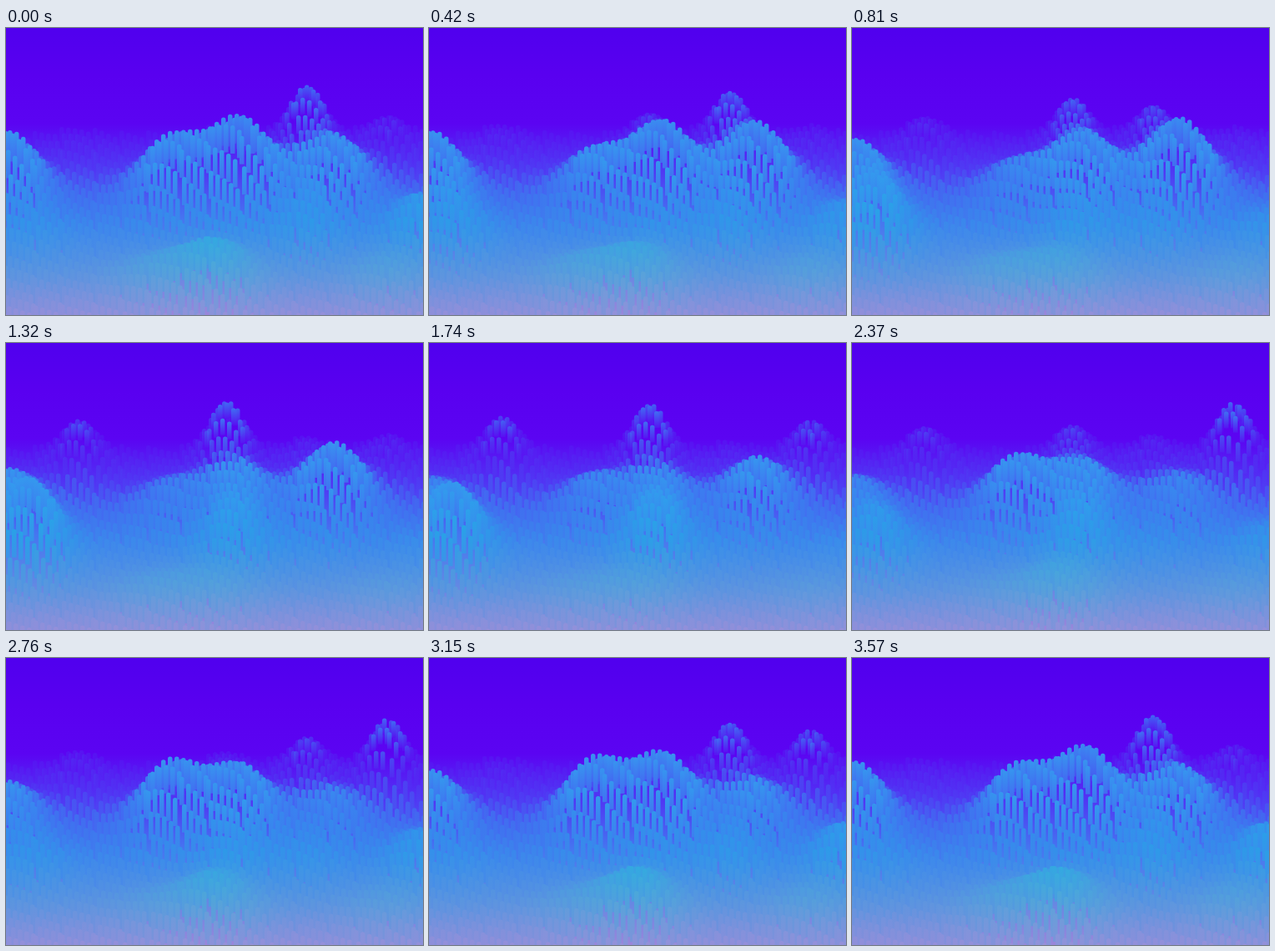
An HTML page with a canvas that plays this animation: 500 px wide and 345 px high, repeating every 3.6 s.

```html
<!DOCTYPE html>
<html lang="en">
<head>
<meta charset="utf-8">
<title>Pillar waves</title>
<style>
  html, body { margin: 0; width: 100%; height: 100%; overflow: hidden; background: #5200ef; }
  canvas { display: block; }
</style>
</head>
<body>
<canvas id="stage" width="500" height="345"></canvas>
<script>
const ctx = document.getElementById('stage').getContext('2d');
const W = 500, H = 345, LOOP = 3600, STEP = 30;
const COL = 8, ROW = 11, PILLAR = 5.5, HORIZON = 126, DEPTH = 30;

// Colours spread evenly from the top of the stage to the bottom.
const palette = text => text.split(' ').map(hex =>
  [0, 2, 4].map(i => parseInt(hex.slice(i, i + 2), 16)));
const FOG = palette('5000ee 5900f0 5b04f2 5038f4 4576f0 5f88e4 9a86da');
const LIGHT = palette('4450f4 425cf4 3893ef 339aee 24a8e5 4caed6 93a1d8');

// Ranks of crests, back to front. A crest is centre x, point of the loop where it peaks, scale.
const RANKS = [
  { y: 152, width: 34, mean: 47, swing: 30, crests: [[85, 0.47, 0.75], [262, 0.4], [358, 0], [455, 0.7]] },
  { y: 204, width: 50, mean: 64, swing: 26, crests: [[0, 0.05, 0.85], [195, 0.85, 0.88], [280, 0], [392, 0.22]] },
  { y: 252, width: 46, mean: 34, swing: 24, crests: [[26, 0.4, 1.4], [270, 0.5], [358, 0, 0.6], [495, 0.93, 0.85]] },
  { y: 310, width: 54, mean: 36, swing: 14, crests: [[175, 0.12, 0.5], [250, 0.92], [455, 0, 0.5]] }
];

const clamp = v => Math.max(0, Math.min(1, v));
const mix = (a, b, k) => a.map((v, i) => v + (b[i] - v) * k);
const css = c => `rgb(${c.map(Math.round).join()})`;

function shade(colours, y) {
  const pos = clamp(y / H) * (colours.length - 1);
  const i = Math.min(Math.floor(pos), colours.length - 2);
  return mix(colours[i], colours[i + 1], pos - i);
}

function verticalFade(top, bottom, colours) {
  const fade = ctx.createLinearGradient(0, top, 0, bottom);
  colours.forEach((c, i) => fade.addColorStop(i / (colours.length - 1), css(c)));
  return fade;
}

const sky = verticalFade(0, H, FOG);

// A skewed lattice, so that each row shows through the gaps of the next.
const lattice = [];
for (let row = 0; row < 28; row++) {
  for (let col = 0; col <= W / COL + 1; col++) {
    lattice.push({
      x: (col - 1) * COL + row * 3 % COL,
      y: HORIZON + row * ROW + col * 2.5 % ROW
    });
  }
}
lattice.sort((a, b) => a.y - b.y);

function swellsAt(phase) {
  return RANKS.flatMap(({ y, width, mean, swing, crests }) =>
    crests.map(([x, peak, scale = 1]) => ({
      x, y, width,
      height: scale * (mean + swing * Math.cos(2 * Math.PI * (phase - peak)))
    })));
}

function heightAt(p, swells) {
  return swells.reduce((sum, s) => {
    const dx = (p.x - s.x) / s.width, dy = (p.y - s.y) / DEPTH;
    return sum + s.height * Math.exp(-dx * dx - dy * dy);
  }, 3);
}

function drawPillar(p, height) {
  const top = p.y - height;
  if (top > H) return;
  const near = clamp((p.y - 165) / 30);
  const length = 20 + 14 * near;
  const lit = 0.3 + 0.7 * clamp(height / 55);
  const head = mix(shade(FOG, top), shade(LIGHT, top), lit);
  const foot = mix(shade(FOG, top + length), head, 0.15 + 0.45 * near);
  ctx.globalAlpha = clamp(Math.max(0.2, (height / 75) ** 2, near));
  ctx.fillStyle = verticalFade(top, top + length, [head, foot]);
  ctx.beginPath();
  ctx.roundRect(p.x, top, PILLAR, length, [PILLAR / 2, PILLAR / 2, 0, 0]);
  ctx.fill();
}

function draw(time) {
  const swells = swellsAt(time / LOOP);
  ctx.globalAlpha = 1;
  ctx.fillStyle = sky;
  ctx.fillRect(0, 0, W, H);
  lattice.forEach(p => drawPillar(p, heightAt(p, swells)));
}

let shown = -1;
function tick() {
  const time = Math.floor(performance.now() % LOOP / STEP) * STEP;
  if (time !== shown) draw(shown = time);
  requestAnimationFrame(tick);
}
tick();
</script>
</body>
</html>
```
